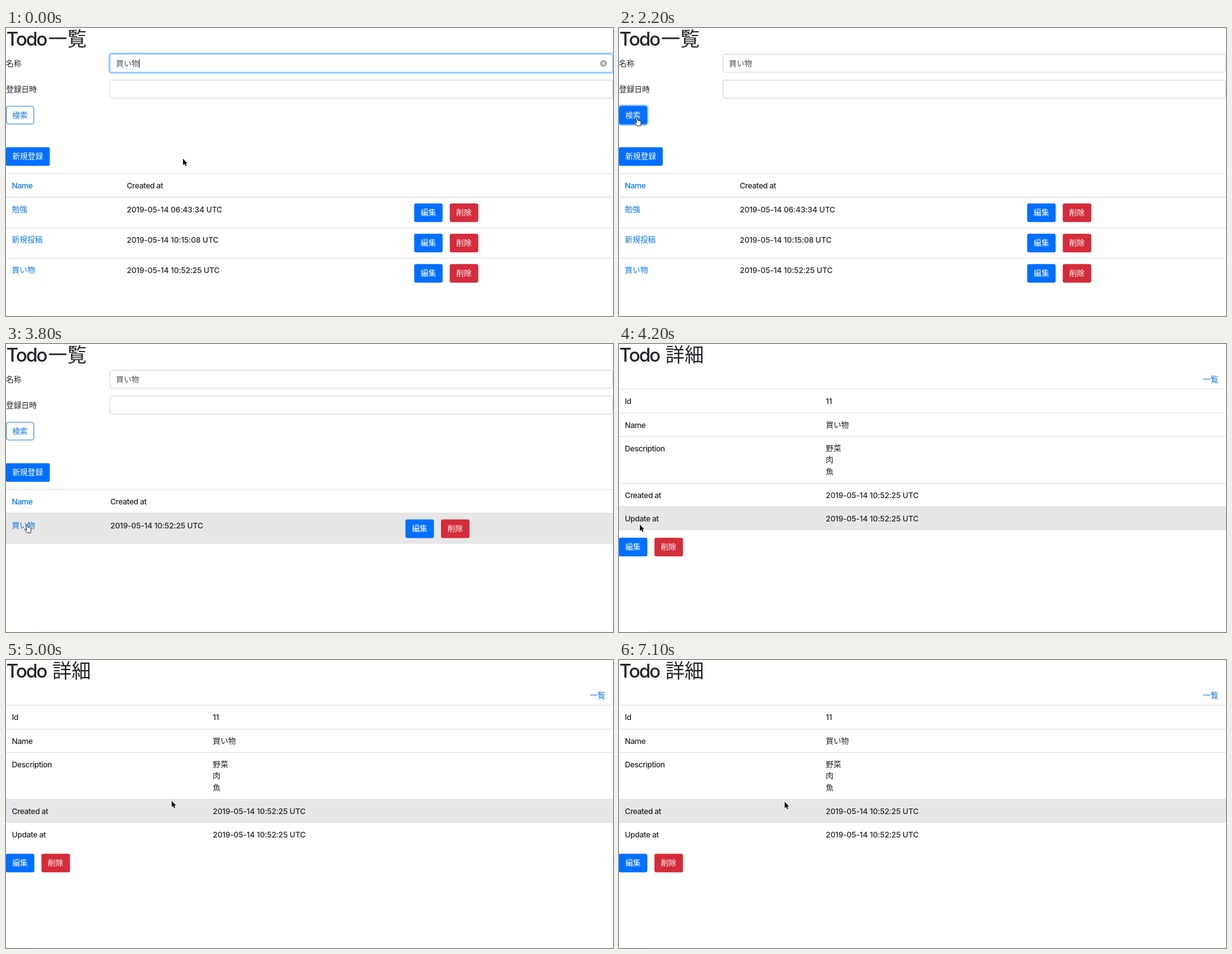
Animation of 960 by 456 pixels, one loop 7400 ms. Source, as an HTML page with a canvas:

```html
<!DOCTYPE html>
<html lang="ja">
<meta charset="utf-8">
<style>
  html, body { margin: 0; width: 100%; height: 100%; overflow: hidden; background: #fff; }
  canvas { display: block; }
</style>
<canvas id="stage" width="960" height="456"></canvas>
<script>
const ctx = document.getElementById('stage').getContext('2d');
const LOOP = 7400, STEP = 100;
const FOCUS_END = 2100, RESULT_AT = 2800, DETAIL_AT = 4000;
const BLUE = '#006fff', RED = '#d42c3b', LINK = '#0b76ea', INK = '#212529', LINE = '#dcdfe2', HOVER = '#e7e7e7';
const LATIN = 'Inter, "Noto Sans CJK JP", sans-serif', CJK = '"Noto Sans CJK JP", sans-serif';

// time, x, y of the pointer tip
const POINTER = [
  [0, 280, 207], [400, 280, 207], [1100, 150, 180], [1700, 28, 142], [3300, 28, 142],
  [3400, 30, 247], [3600, 32, 281], [3800, 33, 286], [4600, 33, 286], [4900, 258, 206],
  [5000, 262, 223], [5500, 262, 223], [5600, 262, 224.5]
];

const ARROW = new Path2D('M0 0V10L2.3 7.9L3.9 11.6L5.6 10.9L4.1 7.2H7Z');
const HAND = new Path2D('M-1.2 1Q0-.7 1.2 1L1.9 4.6Q3 4 3.6 5Q4.8 4.5 5.4 5.6Q6.8 5.4 7 7L6.6 9.5L5.8 13H.6L-2.6 9Q-4.2 6.8-2.6 6.8L-.2 8.4Z');

const ramp = (t, from, to) => Math.min(1, Math.max(0, (t - from) / (to - from)));

function pointerAt(t) {
  const i = POINTER.findIndex(p => p[0] > t);
  if (i < 0) return POINTER.at(-1).slice(1);
  const [t0, x0, y0] = POINTER[i - 1], [t1, x1, y1] = POINTER[i];
  const k = ramp(t, t0, t1);
  return [x0 + (x1 - x0) * k, y0 + (y1 - y0) * k];
}

// Digits are set a little wider than words.
function text(str, x, middle, color = INK) {
  const latin = /^[ -~]+$/.test(str);
  ctx.font = latin ? '450 12.2px ' + LATIN : '12.2px ' + CJK;
  ctx.letterSpacing = !latin ? '0px' : /\d/.test(str) ? '-0.13px' : '-0.33px';
  ctx.fillStyle = color;
  ctx.fillText(str, x, middle + 4.5);
}

function title(str, x) {
  ctx.fillStyle = INK;
  ctx.font = '500 29.5px ' + LATIN;
  ctx.letterSpacing = '-1.8px';
  ctx.fillText('Todo', 0.5, 28);
  ctx.font = '30.4px ' + CJK;
  ctx.letterSpacing = '0px';
  ctx.fillText(str, x, 28.3);
}

function box(x, y, w, h, fill, stroke, lineWidth = 1, radius = 3) {
  ctx.beginPath();
  ctx.roundRect(x, y, w, h, radius);
  if (fill) { ctx.fillStyle = fill; ctx.fill(); }
  if (stroke) { ctx.strokeStyle = stroke; ctx.lineWidth = lineWidth; ctx.stroke(); }
}

const glow = (x, y, w, h, alpha) => box(x - 1.3, y - 1.3, w + 2.6, h + 2.6, null, `rgba(0,123,255,${alpha})`, 2.4, 4);

function button(label, x, y, color, w = 44.5) {
  box(x - 0.3, y - 0.3, w + 0.6, 29.6, color);
  text(label, x + 9.9, y + 14.5, '#fff');
}

function rule(y, h = 1) {
  ctx.fillStyle = LINE;
  ctx.fillRect(0, y, 960, h);
}

function hoverRow(top, bottom, y) {
  if (y < top || y >= bottom) return;
  ctx.fillStyle = HOVER;
  ctx.fillRect(0, top, 960, bottom - top);
}

function field(label, middle, focused) {
  const y = middle - 14.5;
  text(label, 0, middle);
  if (focused) glow(164.5, y, 795, 28.5, 0.35);
  box(164.5, y, 795, 28.5, '#fff', focused ? '#80bdff' : '#ced4da');
}

function clearIcon(x, y) {
  ctx.beginPath();
  ctx.arc(x, y, 5.3, 0, 7);
  ctx.fillStyle = '#a6a6a6';
  ctx.fill();
  ctx.beginPath();
  ctx.moveTo(x - 2, y - 2); ctx.lineTo(x + 2, y + 2);
  ctx.moveTo(x + 2, y - 2); ctx.lineTo(x - 2, y + 2);
  ctx.strokeStyle = '#fff';
  ctx.lineWidth = 1.2;
  ctx.stroke();
}

function searchButton(t) {
  const fill = ramp(t, 1650, 1800) - ramp(t, 3280, 3430);
  if (t >= FOCUS_END && t < RESULT_AT) glow(0.5, 124, 43.5, 28, 0.5);
  ctx.globalAlpha = fill;
  box(0.5, 124, 43.5, 28, BLUE);
  ctx.globalAlpha = 1;
  box(0.5, 124, 43.5, 28, null, fill === 1 ? BLUE : '#2580ee');
  text('検索', 9.9, 138, fill > 0.5 ? '#fff' : LINK);
}

function listPage(t, y) {
  const focused = t < FOCUS_END, filtered = t >= RESULT_AT;
  title('一覧', 66.5);
  field('名称', 56, focused);
  field('登録日時', 97, false);
  text('買い物', 174, 56, '#495057');
  if (focused) {
    clearIcon(944.8, 56);
    if ((t + 400) % 1000 < 500) {
      ctx.fillStyle = INK;
      ctx.fillRect(210.5, 49, 1, 14);
    }
  }
  searchButton(t);
  button('新規登録', 0, 189, BLUE, 69);

  const dateX = filtered ? 165 : 191, editX = filtered ? 632 : 645.8;
  const rows = [['勉強', '06:43:34'], ['新規投稿', '10:15:08'], ['買い物', '10:52:25']].slice(filtered ? 2 : 0);
  rule(230);
  text('Name', 9.3, 249.5, LINK);
  text('Created at', dateX, 249.5);
  rows.forEach(([name, time], i) => {
    const top = 268.5 + 48 * i;
    hoverRow(top, top + 48, y);
    if (i) rule(top - 0.5);
    text(name, 9.3, top + 19, LINK);
    text(`2019-05-14 ${time} UTC`, dateX, top + 19);
    button('編集', editX, top + 9.5, BLUE);
    button('削除', editX + 56.3, top + 9.5, RED);
  });
  rule(267.3, 1.5);
}

function detailPage(y) {
  const stamp = '2019-05-14 10:52:25 UTC';
  const rows = [
    ['Id', 71.8, 109.1, '11'], ['Name', 109.1, 146.5, '買い物'], ['Description', 146.5, 220.4, '野菜', '肉', '魚'],
    ['Created at', 220.4, 257.8, stamp], ['Update at', 257.8, 295, stamp]
  ];
  title('詳細', 73.3);
  text('一覧', 923.5, 56.5, LINK);
  for (const [label, top, bottom, ...values] of rows) {
    hoverRow(top, bottom, y);
    rule(Math.floor(top));
    text(label, 9.3, top + 19);
    values.forEach((value, i) => text(value, 327, top + 19 + 18.4 * i));
  }
  button('編集', 0, 307, BLUE);
  button('削除', 56.4, 307, RED);
}

function pointer(t, x, y) {
  const onButton = x < 44 && y > 123 && y < 153;
  const onLink = t >= RESULT_AT && x < 46 && y > 279 && y < 295;
  const hand = t < DETAIL_AT && (onButton || onLink);
  ctx.save();
  ctx.translate(x, y);
  ctx.lineJoin = 'round';
  if (hand) {
    ctx.fillStyle = '#fff';
    ctx.strokeStyle = '#111';
    ctx.lineWidth = 0.9;
    ctx.fill(HAND);
    ctx.stroke(HAND);
  } else {
    ctx.fillStyle = '#000';
    ctx.strokeStyle = '#fff';
    ctx.lineWidth = 1.3;
    ctx.stroke(ARROW);
    ctx.fill(ARROW);
  }
  ctx.restore();
}

function draw(now) {
  const t = Math.floor((now % LOOP) / STEP) * STEP;
  const [x, y] = pointerAt(t);
  ctx.fillStyle = '#fff';
  ctx.fillRect(0, 0, 960, 456);
  ctx.fillStyle = '#fafafa';
  ctx.fillRect(45, 454, 915, 2);
  if (t < DETAIL_AT) listPage(t, y);
  else detailPage(y);
  pointer(t, x, y);
  requestAnimationFrame(draw);
}
requestAnimationFrame(draw);
</script>
</html>
```
